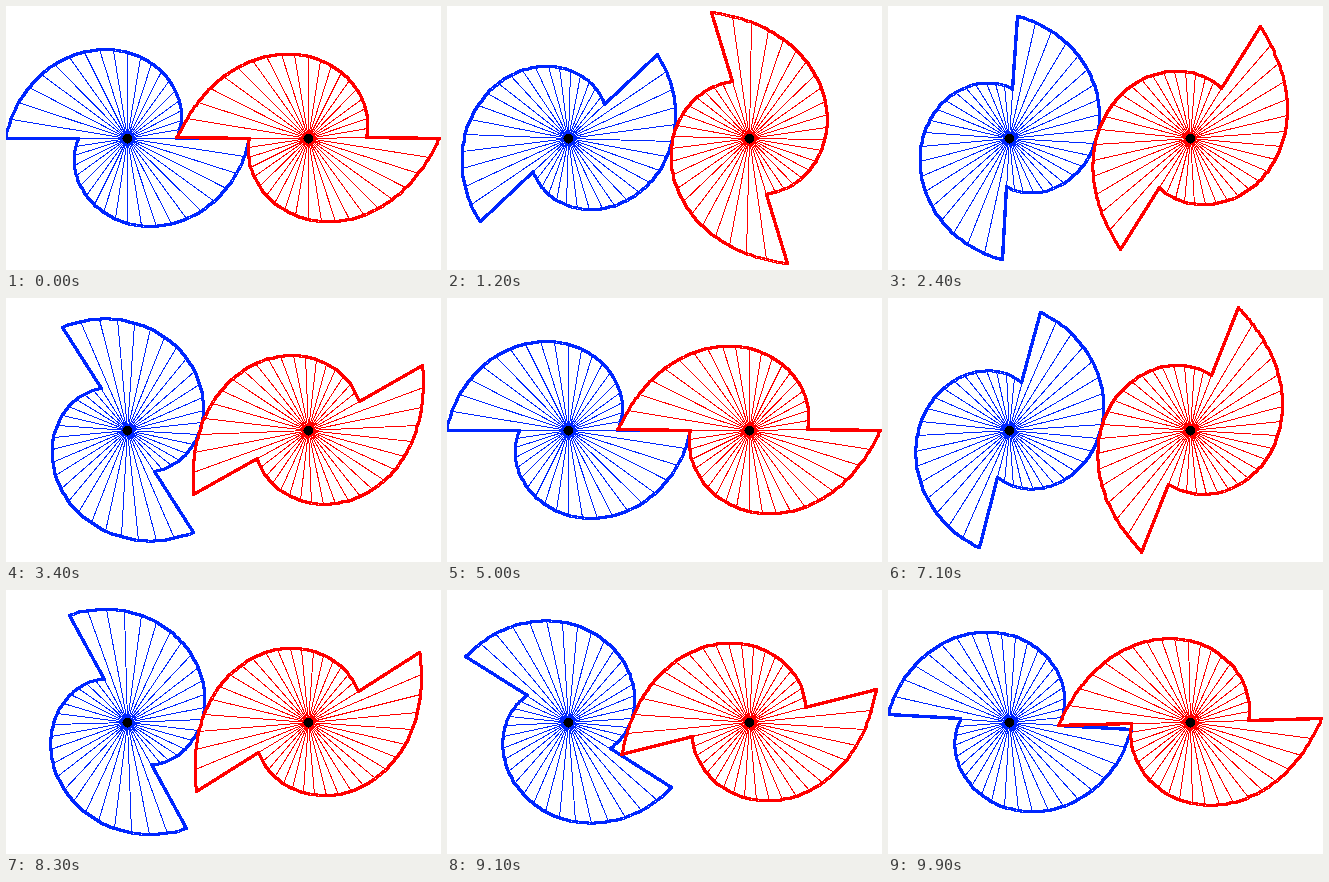
Animation, 435 px wide and 264 px high, one loop 10000 ms. Source, as an HTML page:

```html
<!DOCTYPE html>
<html lang="en">
<head>
<meta charset="utf-8">
<title>Rolling spiral gears</title>
<style>
  html, body { margin: 0; width: 100%; height: 100%; overflow: hidden; background: #fff; }
  svg { display: block; }
  path { fill: none; }
  .rim { stroke-width: 3.4; stroke-linejoin: round; }
</style>
</head>
<body>
<svg id="stage" width="435" height="264" viewBox="0 0 435 264" shape-rendering="crispEdges"></svg>
<script>
const NS = 'http://www.w3.org/2000/svg';
const stage = document.getElementById('stage');

const BLUE_X = 121.8, RED_X = 302.2, AXLE_Y = 132;
const DIST = RED_X - BLUE_X;
const RISE = 72.8;     // radius change over half a turn
const SPOKES = 20;     // per half
const RIM_PARTS = 90;  // per half
const STEP = 100, STEPS = 50;

// Smallest radius for which both gears make the same half turn
const q = Math.exp(2 * RISE / DIST);
const R_MIN = (q * (DIST - RISE) - DIST) / (q - 1);
const R_MAX = R_MIN + RISE;

// u runs from 0 to 1 over half a turn of the blue gear
const blueRadius = u => R_MAX - RISE * u;
const redRadius = u => DIST - blueRadius(u);
const redTurn = u => DIST / RISE * Math.log(redRadius(u) / redRadius(0)) - u;

function invert(fn, value) {
  let lo = 0, hi = 1;
  for (let i = 0; i < 40; i++) {
    const mid = (lo + hi) / 2;
    if (fn(mid) < value) lo = mid; else hi = mid;
  }
  return (lo + hi) / 2;
}

function add(tag, attrs) {
  const el = document.createElementNS(NS, tag);
  for (const key in attrs) el.setAttribute(key, attrs[key]);
  return stage.appendChild(el);
}

// Vertices sit on pixel centres
const snap = v => Math.floor(v) + 0.5;

function makeGear(x, color, radius, turn, start, dir) {
  const rim = [], tips = [];
  for (let half = 0; half < 2; half++) {
    const point = (u, share) => ({ r: radius(u), a: start + Math.PI * (half + dir * share) });
    for (let i = 0; i <= RIM_PARTS; i++) rim.push(point(i / RIM_PARTS, turn(i / RIM_PARTS)));
    for (let i = 0; i < SPOKES; i++) tips.push(point(invert(turn, i / SPOKES), i / SPOKES));
  }
  const hub = snap(x) + ' ' + snap(AXLE_Y);
  const spokePath = add('path', { stroke: color });
  const rimPath = add('path', { stroke: color, class: 'rim' });
  add('circle', { cx: snap(x), cy: snap(AXLE_Y), r: 5 });

  return u => {
    const angle = -dir * Math.PI * turn(u);
    const place = p =>
      snap(x + p.r * Math.cos(p.a + angle)) + ' ' + snap(AXLE_Y + p.r * Math.sin(p.a + angle));
    spokePath.setAttribute('d', tips.map(p => `M${hub}L${place(p)}`).join(''));
    rimPath.setAttribute('d', 'M' + rim.map(place).join('L') + 'Z');
  };
}

const gears = [
  makeGear(BLUE_X, '#0026ff', blueRadius, u => u, 0, 1),
  makeGear(RED_X, '#ff0000', redRadius, redTurn, Math.PI, -1)
];

const begin = performance.now();
let shown = -1;
function draw(now) {
  const step = Math.floor(Math.max(0, now - begin) / STEP) % STEPS;
  if (step !== shown) gears.forEach(pose => pose(step / STEPS));
  shown = step;
  requestAnimationFrame(draw);
}
draw(begin);
</script>
</body>
</html>
```
